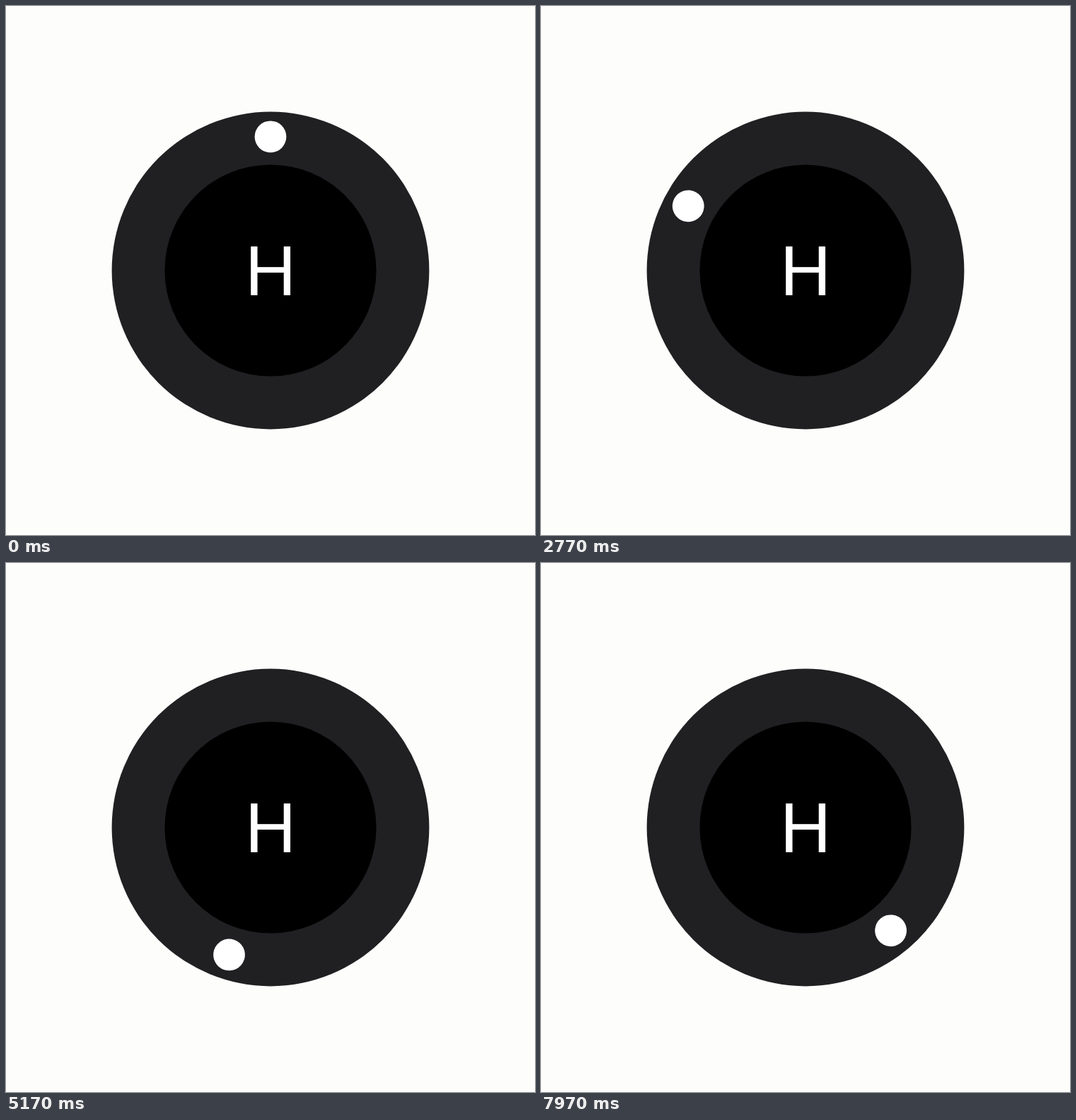
Recreate the animation shown at these times as an HTML page. Size 748 by 748 pixels, loop 8000 ms.

```html
<!DOCTYPE html>
<html lang="en">
<head>
<meta charset="utf-8">
<title>Orbiting dot</title>
<style>
  html, body { margin: 0; width: 100%; height: 100%; overflow: hidden; background: #fdfdfb; }
  svg { display: block; width: 100vw; height: 100vh; }
  text { font: 100px "Liberation Sans", Arial, sans-serif; fill: #fff; text-anchor: middle; }
</style>
</head>
<body>
<svg viewBox="0 0 748 748">
  <circle cx="374" cy="374" r="224.4" fill="#202023"/>
  <circle cx="374" cy="374" r="149.6"/>
  <text x="374" y="408.5">H</text>
  <circle id="dot" cx="374" cy="184.8" r="22.4" fill="#fff"/>
</svg>
<script>
  const LOOP_MS = 8000;
  const STEP_MS = 1000 / 30;
  const STEP_DEGREES = 3.6;
  const dot = document.getElementById("dot");

  function draw() {
    const time = performance.now() % LOOP_MS;
    // Steps start on 10 ms ticks, up to 3.3 ms ahead of the exact 30 fps grid.
    const step = Math.floor((time + 4) / STEP_MS) % 240;
    dot.setAttribute("transform", `rotate(${step * STEP_DEGREES} 374 374)`);
    requestAnimationFrame(draw);
  }
  draw();
</script>
</body>
</html>
```
